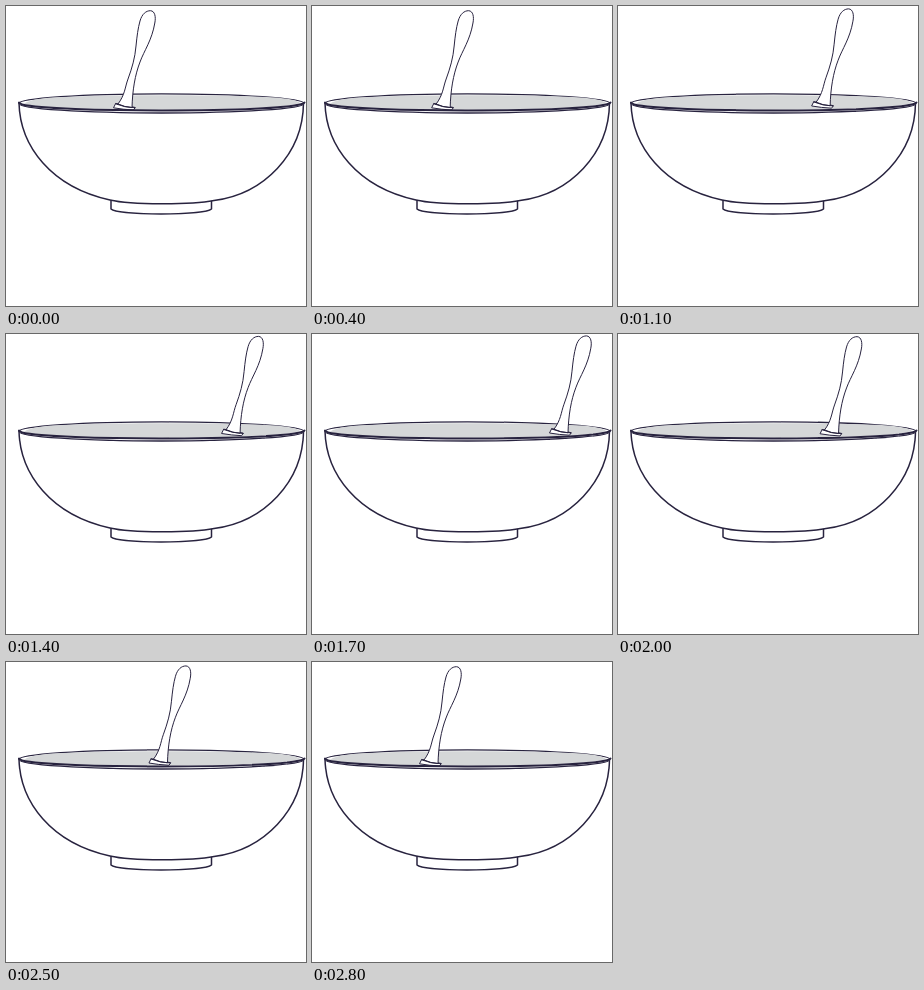
Animation, 300 px wide and 300 px high, one loop 2.9 s. Source, as an HTML page:

```html
<!DOCTYPE html>
<html lang="en">
<head>
<meta charset="utf-8">
<title>Bowl and spoon</title>
<style>
  html, body { margin: 0; width: 100%; height: 100%; overflow: hidden; background: #fff; }
  svg { display: block; width: 100vw; height: 100vh; }
  .ink { fill: #fff; stroke: #28233f; stroke-linejoin: round; stroke-linecap: round; }
  .line { fill: none; }
</style>
</head>
<body>
<svg viewBox="0 0 300 300">
  <g class="ink" stroke-width="1.5">
    <path d="M105 194V203C112 209.5 198 209.5 205.500 203V194"/>
    <path d="M13 97C14 140 45 181 104 194C125 199 185 199 208 194.500C258 188 297 148 297.500 97"/>
    <ellipse cx="155.500" cy="97.400" rx="142.500" ry="9.600" stroke-width="1.300"/>
  </g>
  <path fill="#d5d7d8" d="M17 98Q24 93.500 40 92C90 88.500 220 88.500 270 91.500Q290 93 294 97C270 106 42 106 17 98"/>
  <g id="spoon" class="ink" stroke-width="1">
    <path d="M109.500 97.800L107.500 101.800Q117 103.500 127.500 104L129 101.800Z"/>
    <path d="M112 98C119 89 119 81 122 73C126 62 129 52 130 40C131 30 132 22 134 15C136 8 140 4.700 144.500 4.700C149 5 150 11 148.800 17C146 34 138 45 134 56C129 69 126.500 84 126 101.600Q119 101.200 112 98Z"/>
    <path class="line" d="M109.500 97.800Q118 101.500 129 101.800"/>
  </g>
  <path class="ink line" d="M13 96.500L16 98.500C50 106.500 262 106.500 296 98L298.500 96.500" stroke-width="2"/>
</svg>
<script>
  const LOOP = 2900, STEP = 100;
  // time, x, y
  const keys = [[0, 0, 0], [500, 15.2, 0], [900, 71.5, -1.5], [1700, 130, -2.8], [2800, 0, 0]];
  const spoon = document.getElementById('spoon');

  function offsetAt(time) {
    const i = keys.findIndex(key => key[0] >= time) || 1;
    const [from, to] = [keys[i - 1], keys[i]];
    const part = (time - from[0]) / (to[0] - from[0]);
    return [1, 2].map(axis => from[axis] + (to[axis] - from[axis]) * part);
  }

  function draw() {
    const time = Math.floor(performance.now() % LOOP / STEP) * STEP;
    spoon.setAttribute('transform', `translate(${offsetAt(time)})`);
    requestAnimationFrame(draw);
  }
  draw();
</script>
</body>
</html>
```
